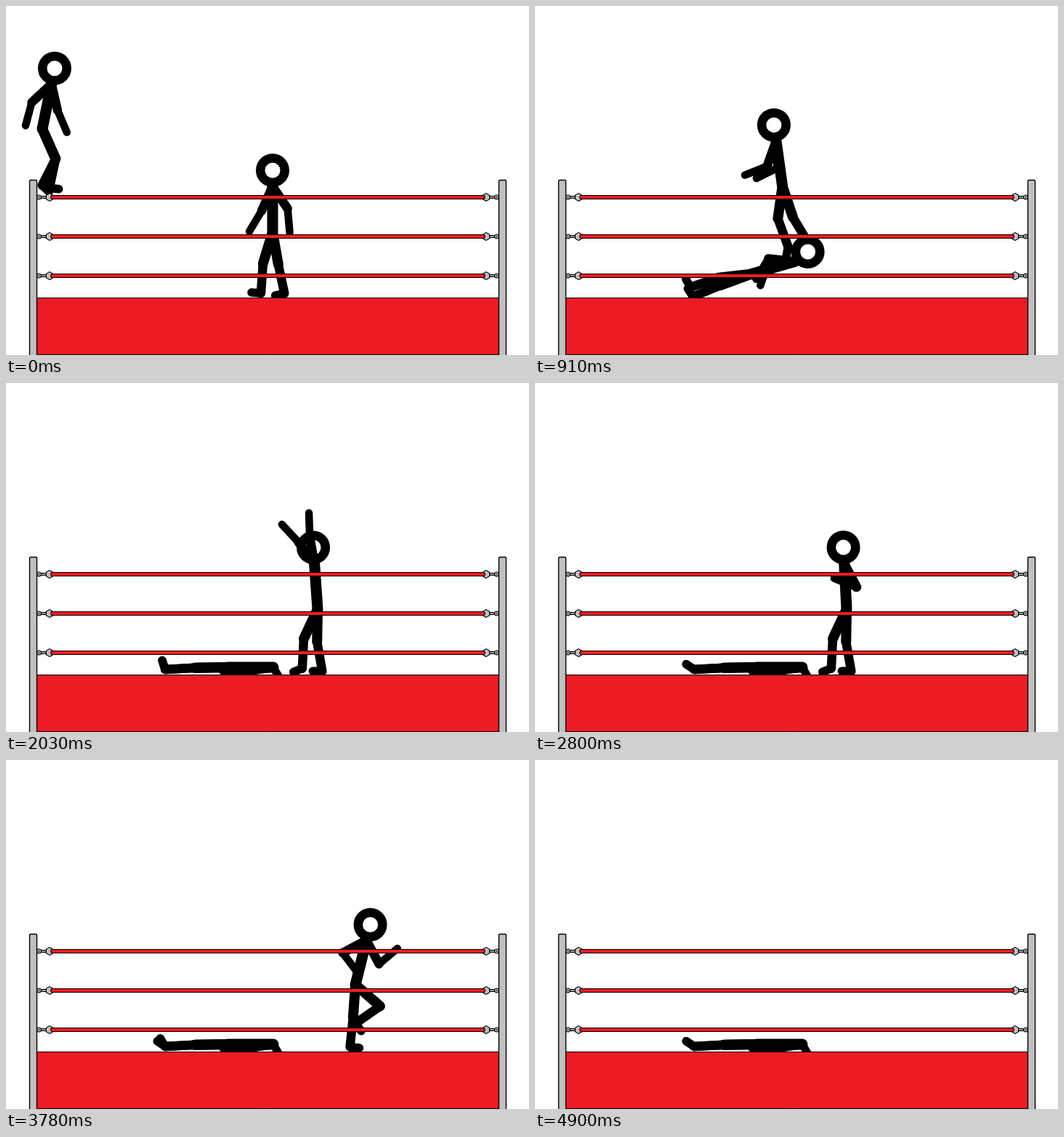
Write an HTML page with a canvas that moves like this. It is 720x480 px and loops after 5040 ms.

```html
<!DOCTYPE html>
<html>
<head>
<meta charset="utf-8">
<style>
html, body { margin: 0; width: 100%; height: 100%; overflow: hidden; background: #fff; }
canvas { display: block; }
</style>
</head>
<body>
<canvas id="stage" width="720" height="480"></canvas>
<script>
const ctx = document.getElementById('stage').getContext('2d');
const LOOP = 5040, STEP = 70;
const RED = '#ed1c24', GREY = '#c0c0c0', INK = '#000';
const TORSO = 63, NECK = 22;
const ARM = { lengths: [37, 33], widths: [12.5, 10.5] };
const LEG = { lengths: [45, 41, 13], widths: [14, 12.5, 11.5] };

// Angles in degrees: lean is from upright, limbs from straight down,
// positive to the right. Ankles are relative to the shin.
const pose = (lean, arms, legs, ankles, nod = 0, neck = NECK) =>
  [lean, nod, neck, ...arms, ...legs, ...ankles];

const LEFT = [-90, -90], RIGHT = [90, 90];
const ease = [-22, -7, 19, -4], planted = [-25, -3, -1, 10], plantedFeet = [-66, -100];
const guard = [-5, -109, 17, -90];

const perch = pose(11.5, [-47, -15, 13, 23], [24, -27, 24, -12], [74, 95]);
const kick = pose(13, [-44, 0, -18, -20], [77, 55, 63, 51], RIGHT);
const kneeUp = pose(-20.5, guard, [-59, -1, -8, 19], [-102, -102]);
const stomp = pose(-15, guard, [-35, -18, -8, 12], LEFT);
const stand = pose(-3, ease, planted, plantedFeet);
const cheer = pose(-4, [-143, -137, -170, -178], planted, plantedFeet);
const wave = pose(-3, [-135, -150, -178, -168], planted, plantedFeet);
const clap = pose(-3, [28, -116, 27, -112], planted, plantedFeet);
const taunt = pose(-28, [-60, -70, -8, 10], planted, plantedFeet);
const bow = pose(-36, [-30, -40, -8, 10], planted, plantedFeet);
const run = pose(14, [-62, 37, 28, 130], [49, -55, -4, -6], RIGHT);
const runBack = pose(14, [28, 130, -62, 37], [-4, -6, 49, -55], RIGHT);
const leap = pose(15, [-100, -115, 95, 110], [50, -40, 35, -50], RIGHT);

const idle = pose(0, [-24, -31, 34, 5], [-17, -4, 10, 12], LEFT);
const stride = pose(5, [-55, -75, -50, -70], [-25, -5, 15, 18], LEFT);
const hit = pose(34, [-101, 158, -131, 117], [-70, -33, -22, -20], LEFT);
const lying = [[-82, -90, -82, -90], [-89, -87, -89, -87]];
const flat = pose(90, ...lying, [-75, -75], -30);
const crushed = pose(90, ...lying, [-75, -75], 60, 40);
const limp = pose(90, ...lying, [-37, -37], 60, 40);
const UP_TOE = -62;

// Cues: time, pose, hip x, hip y, then hop height and easing power on the way in.
const jumper = [
  [0, perch, 50, 169],
  [560, kick, 195, 180, 42],
  [1120, kneeUp, 428, 311, 15],
  [1260, stomp, 428, 312],
  [1400, kneeUp, 428, 311],
  [1680, stand, 429, 311],
  [2030, cheer, 429, 311],
  [2170, wave, 429, 311],
  [2310, cheer, 429, 311],
  [2800, clap, 429, 311],
  [3010, taunt, 429, 311],
  [3080, taunt, 429, 311],
  [3150, bow, 429, 311],
  [3290, taunt, 429, 311],
  [3360, taunt, 429, 311],
  [3570, runBack, 436, 311],
  [3780, run, 481, 309, 0, 1.4],
  [3920, runBack, 548, 306],
  [4130, leap, 674, 146, 30],
  [4340, leap, 800, 220, 30]
];
const victim = [
  [0, idle, 367, 311],
  [280, stride, 345, 312],
  [560, hit, 279, 313],
  [1050, flat, 305, 391],
  [1190, flat, 305, 391],
  [1260, crushed, 305, 391],
  [2240, crushed, 305, 391],
  [2800, limp, 305, 391]
];

const mix = (a, b, k) => a + (b - a) * k;

function act(cues, t) {
  const i = cues.findIndex(cue => cue[0] > t);
  const [t0, from, x0, y0] = cues.at(i < 0 ? -1 : i - 1);
  if (i < 0) return { x: x0, y: y0, angles: [...from] };
  const [t1, to, x1, y1, hop = 0, power = 1] = cues[i];
  const k = (t - t0) / (t1 - t0), moved = k ** power;
  return {
    x: mix(x0, x1, moved),
    y: mix(y0, y1, moved) - 4 * hop * k * (1 - k),
    angles: from.map((a, j) => mix(a, to[j], k))
  };
}

function line(x1, y1, x2, y2, width, color = INK) {
  ctx.strokeStyle = color;
  ctx.lineWidth = width;
  ctx.beginPath();
  ctx.moveTo(x1, y1);
  ctx.lineTo(x2, y2);
  ctx.stroke();
}

function polar(x, y, length, degrees) {
  const a = degrees * Math.PI / 180;
  return [x + length * Math.sin(a), y + length * Math.cos(a)];
}

function limb(x, y, { lengths, widths }, angles) {
  angles.forEach((angle, i) => {
    const [ex, ey] = polar(x, y, lengths[i], angle);
    line(x, y, ex, ey, widths[i]);
    [x, y] = [ex, ey];
  });
}

function figure({ x, y, angles }) {
  const [lean, nod, neck, ...joints] = angles;
  const [nx, ny] = polar(x, y, TORSO, 180 - lean);
  const up = 180 - lean - nod;
  shape(() => ctx.arc(...polar(nx, ny, neck, up), 16.75, 0, 7), '#fff', 12.5);
  ctx.lineCap = 'round';
  line(nx, ny, ...polar(nx, ny, Math.max(0, neck - 18), up), 11);
  line(nx, ny, x, y, 15);
  for (const side of [0, 1]) {
    const [shoulder, elbow] = joints.slice(2 * side);
    const [hip, knee] = joints.slice(4 + 2 * side);
    limb(nx, ny, ARM, [shoulder, elbow]);
    limb(x, y, LEG, [hip, knee, knee + joints[8 + side]]);
  }
}

function shape(path, fill, width = 1.2) {
  ctx.fillStyle = fill;
  ctx.strokeStyle = INK;
  ctx.lineWidth = width;
  ctx.beginPath();
  path();
  ctx.fill();
  ctx.stroke();
}

function turnbuckle(x, y, dir) {
  ctx.save();
  ctx.translate(x, y);
  ctx.scale(dir, 1);
  line(3, 0, 15, 0, 4);
  line(5, 0, 14, 0, 1.6, GREY);
  shape(() => ctx.arc(2.5, 0, 3, 0, 7), GREY);
  shape(() => ctx.arc(2.5, 0, 0.7, 0, 7), INK, 0.5);
  shape(() => {
    for (let i = 0; i < 6; i++) ctx.lineTo(...polar(17, 0, 5.4, 60 * i));
    ctx.closePath();
  }, GREY);
  ctx.restore();
}

function ring() {
  ctx.lineCap = 'butt';
  shape(() => ctx.rect(42.5, 401.5, 636, 78), RED, 1);
  for (const y of [263, 317, 371]) {
    ctx.lineCap = 'butt';
    turnbuckle(43, y, 1);
    turnbuckle(678, y, -1);
    ctx.lineCap = 'round';
    line(64, y, 657, y, 6);
    line(64, y, 657, y, 4, RED);
  }
  for (const x of [32.5, 678.5]) {
    shape(() => ctx.roundRect(x, 239.5, 10, 250, 1.5), GREY, 1.4);
  }
}

function draw(t) {
  ctx.fillStyle = '#fff';
  ctx.fillRect(0, 0, 720, 480);

  figure(act(jumper, t));
  const fallen = act(victim, t);
  const twitch = t >= 4480 && Math.floor((t - 4480) / 140) % 2 === 0;
  if (twitch || (t >= 2940 && t < 3990)) fallen.angles[fallen.angles.length - 1] = UP_TOE;
  figure(fallen);

  // The stomp rattles the ring, then dies away.
  const beat = (t - 1260) / STEP;
  const jolt = beat >= 0 && beat < 2 ? (-0.4) ** beat : 0;
  ctx.save();
  ctx.translate(jolt, 3 * jolt);
  ring();
  ctx.restore();
}

function tick() {
  draw(Math.floor(performance.now() % LOOP / STEP) * STEP);
  requestAnimationFrame(tick);
}
tick();
</script>
</body>
</html>
```
